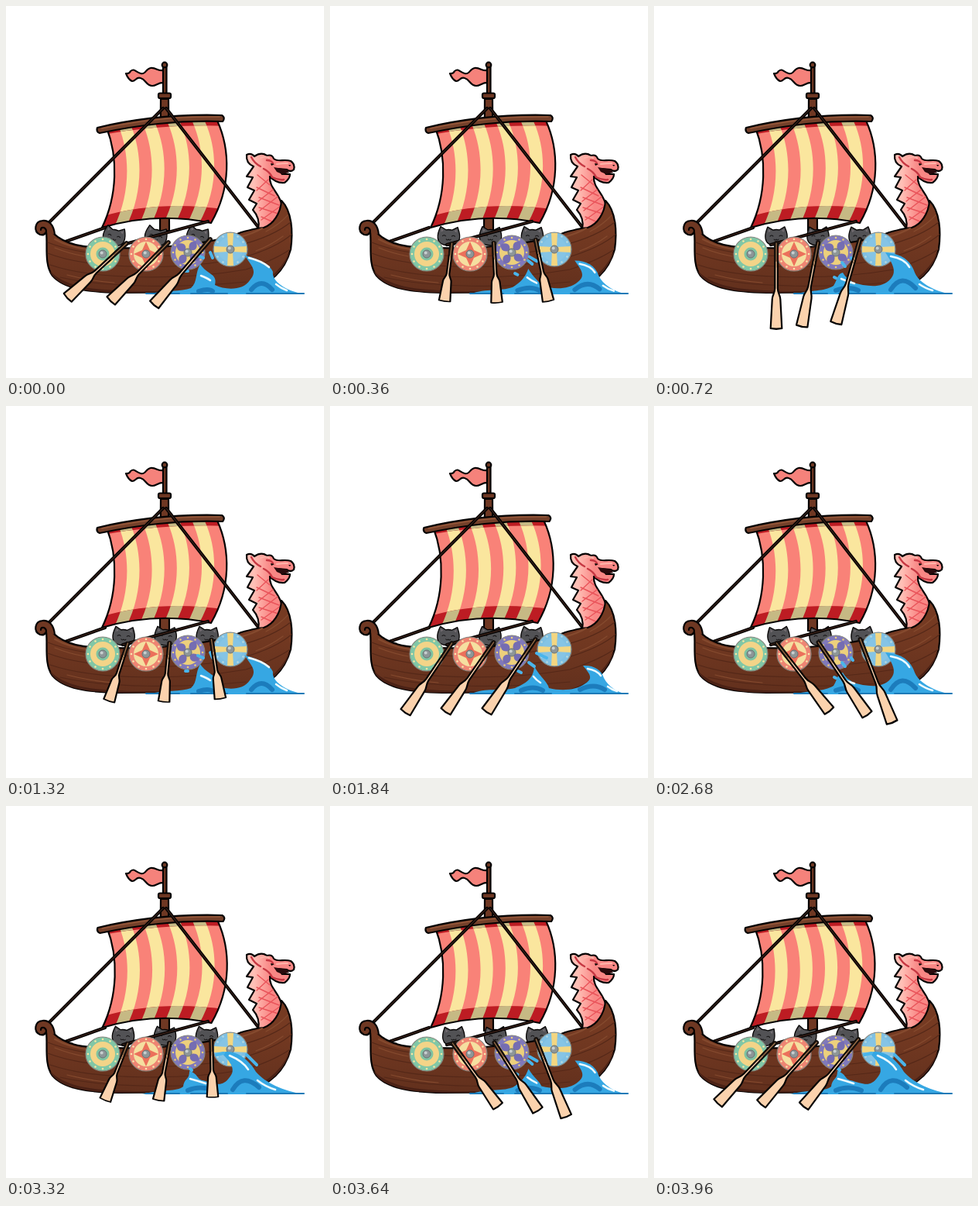
Animation of 411x480 px, one loop 4000 ms. Source, as an HTML page:

```html
<!DOCTYPE html>
<html lang="en">
<head>
<meta charset="utf-8">
<title>Longship</title>
<style>
html, body { margin: 0; width: 100%; height: 100%; overflow: hidden; background: #fff; }
svg { display: block; width: 100vw; height: 100vh; }
.ink { stroke: #050303; stroke-width: 2.2; stroke-linejoin: round; stroke-linecap: round; }
.line { fill: none; stroke-linecap: round; stroke-linejoin: round; }
.wood { fill: #6f3823; }
</style>
</head>
<body>
<svg viewBox="0 0 411 480">
  <defs>
    <linearGradient id="hullFill" x2="0" y2="1">
      <stop offset=".3" stop-color="#753a22"/><stop offset="1" stop-color="#62301d"/>
    </linearGradient>
    <linearGradient id="neckFill"><stop offset=".15" stop-color="#ffc0b6"/><stop offset=".5" stop-color="#f98785"/></linearGradient>
    <clipPath id="sailClip"><path class="sailShape"/></clipPath>
    <clipPath id="hullClip"><path class="hullShape"/></clipPath>
    <clipPath id="bandClip"><path d="M110,150 Q190,134 290,139 V155 Q195,151 110,169Z M110,276 Q195,247 300,265 V296 H110Z"/></clipPath>
    <g id="cat">
      <path class="ink" fill="#525255" style="stroke-width:1.3" d="M-14,4 C-15,-2 -13,-6 -11,-11 L-4,-7 Q0,-8 4,-7 L11,-11 C13,-6 15,-2 14,4 C13,11 7,13 0,13 S-13,11 -14,4Z"/>
      <path fill="#777075" d="M-10,-8 L-7,-6 -10,-4Z M10,-8 L7,-6 10,-4Z"/>
      <path class="line" stroke="#151314" stroke-width="1" d="M-8,1 q2,-2 4,0 M4,1 q2,-2 4,0 M-3,5 q1.5,2 3,0 q1.5,2 3,0"/>
    </g>
    <g id="oar">
      <path class="ink" fill="#fbd2ad" d="M-1.8,0 L-1.8,56 C-2,63 -5,64 -5.3,70 L-7.3,106 Q0,107.500 7.300,106 L5.300,70 C5,64 2,63 1.800,56 L1.800,0Z"/>
      <path class="line" stroke="#16100d" stroke-width="5.6" d="M0,0 V20"/>
      <path class="line" stroke="#a8794f" stroke-width="1.2" d="M0,0 V30"/>
    </g>
  </defs>

  <!-- mast and flag -->
  <path class="ink" fill="#f5827b" d="M205,82 C197,86 195,79 187,80 C180,81 181,89 174,87 C167,85 166,80 161,84 Q159,88 155,87 Q158,95 163,97 C168,97 168,91 174,93 C181,95 181,103 189,103 C195,103 196,98 206,99Z"/>
  <path fill="#4b1c19" d="M206,82 C201,84 201,93 206,96Z"/>
  <path class="ink wood" d="M203,78 H207.500 V114 H203Z"/>
  <circle class="ink wood" cx="205" cy="76" r="3.300"/>
  <path class="ink wood" d="M200,120 H210 L211,290 H199Z"/>
  <rect class="ink wood" x="197" y="112.500" width="16" height="6.500" rx="2"/>

  <g id="sail">
    <g id="stripes" clip-path="url(#sailClip)"></g>
    <path class="ink sailShape" fill="none"/>
    <path class="ink" fill="#74402a" d="M118,157 C160,147 210,139 279,141 Q284,144 280,149 C220,147 170,154 121,164 Q116,162 118,157Z"/>
    <path class="line" stroke="#955739" stroke-width="1.500" d="M124,158 C165,149 215,142 276,143"/>
  </g>

  <g id="cats"></g>
  <g id="ropes" class="line"></g>

  <!-- dragon figurehead -->
  <path class="ink" fill="url(#neckFill)" d="M326,288 Q329,274 319,263 L324,255 L314,250 L321,238 L312,234 L319,221 L311,220 L320,207 Q310,203 311,192 Q317,189 321,194 Q330,188 337,193 Q344,191 346,197 C352,202 359,197 368,200 Q374,204 372,211 Q368,215 363,211 L352,210 L357,217 L367,217 Q367,223 360,228 Q349,229 341,220 C340,235 353,240 357,258 C358,274 345,287 326,288Z"/>
  <path class="line" stroke="#e9545a" stroke-width="1.400" d="M325,218 L341,231 M339,224 L324,238 M324,234 L347,245 M345,237 L326,252 M327,247 L353,257 M351,246 L328,264 M327,260 L355,269 M355,258 L330,276 M330,272 L348,280"/>
  <path class="line" stroke="#c73843" stroke-width="2.500" d="M317,195 Q321,203 329,207 M337,199 Q343,199 345,203 M333,210 Q341,214 344,221 Q352,225 359,224"/>
  <path class="line" stroke="#ffb5ab" stroke-width="2" d="M329,196 Q337,193 340,196 M350,204 Q357,203 364,203"/>
  <path fill="#2a0b0d" d="M346,208 L363,211 366,215 357,217 350,214Z"/>
  <path d="M342,203 l5,1 -4,2Z M365,205 h3 l-1,2Z"/>

  <!-- hull -->
  <path class="hullShape ink" fill="url(#hullFill)"/>
  <g clip-path="url(#hullClip)" class="line" stroke="#552818" stroke-width="1.200">
    <path d="M54,305 C110,328 230,328 300,309 Q345,298 369,278 M54,319 C110,341 230,341 305,325 Q350,312 370,294 M57,334 C115,354 230,354 310,340 Q350,327 370,312 M70,350 C130,364 230,364 310,356"/>
    <path stroke="#854a2e" d="M63,312 Q80,319 101,323 M336,291 Q353,282 364,270 M79,347 Q110,355 140,357 M323,316 Q342,309 358,297"/>
    <path stroke="#4a2115" stroke-width="4" d="M56,344 C78,367 120,369 175,370 H300 Q349,360 368,319"/>
  </g>
  <path class="ink wood" d="M63,295 C62,282 55,276 47,277 C37,278 35,291 44,295 C51,297 55,289 49,286 Q45,285 45,289"/>
  <path class="line" stroke="#854a2e" stroke-width="2" d="M63,301 Q82,311 104,314 M270,305 Q309,299 331,287"/>

  <g id="shields"></g>

  <!-- water -->
  <path id="wave" fill="#36a7e3"/>
  <path id="shade" class="line" stroke="#1c7cbc" stroke-width="6"/>
  <path id="foam" class="line" stroke="#eefbff" stroke-width="2.6"/>
  <path id="drops" class="line" stroke="#49b5ec" stroke-width="4"/>
  <path class="line" stroke="#1d7ab7" stroke-width="2" d="M181,371 H224 M239,371 H286 M311,371 H385"/>

  <g id="oars"></g>
</svg>
<script>
const $ = id => document.getElementById(id);
const NS = 'http://www.w3.org/2000/svg';
const add = (parent, tag, attrs) => {
  const node = document.createElementNS(NS, tag);
  for (const key in attrs) node.setAttribute(key, attrs[key]);
  parent.append(node);
  return node;
};
const setShape = (name, d) => document.querySelectorAll('.' + name).forEach(e => e.setAttribute('d', d));

setShape('hullShape', 'M53,282 C60,297 80,310 112,311 C185,316 270,307 304,292 Q326,286 333,286 C345,282 355,268 356,251 C370,265 371,292 368,314 C361,340 342,360 310,369 L145,370 C105,369 75,365 60,348 C49,333 54,309 52,292Z');
setShape('sailShape', 'M130,157 Q190,145 273,148 C290,185 291,235 265,280 Q195,265 124,286 C144,245 145,195 130,157Z');

// Vertical curve across the sail, u running from its left to its right edge.
const seam = u => [[130 + 143 * u, 157 - 9 * u], [145 + 145 * u, 195 - 10 * u],
  [144 + 147 * u, 245 - 10 * u], [124 + 141 * u, 286 - 6 * u]];
function drawSail() {
  const area = { x: 110, y: 135, width: 190, height: 160 };
  const stripe = i => {
    const a = seam(i / 9), b = seam((i + 1) / 9);
    return `M${a[0][0]},135 L${a[0]} C${a.slice(1).join(' ')} L${a[3][0] - 6},296 H${b[3][0] - 6} L${b[3]} C${b[2]} ${b[1]} ${b[0]} V135Z`;
  };
  const d = [1, 3, 5, 7].map(stripe).join('');
  const paint = (g, red, cream) => {
    add(g, 'rect', { ...area, fill: red });
    add(g, 'path', { d, fill: cream });
  };
  paint($('stripes'), '#f98278', '#fae69e');
  paint(add($('stripes'), 'g', { 'clip-path': 'url(#bandClip)' }), '#bd1c23', '#c6b984');
}

function drawRopes() {
  const d = 'M203,132 L55,280 M207,132 L325,284 M74,305 L128,286 M151,308 L261,278';
  add($('ropes'), 'path', { d, stroke: '#080504', 'stroke-width': 4.2 });
  add($('ropes'), 'path', { d, stroke: '#4a291e', 'stroke-width': 1 });
}

function drawShield(x, y, rim, field, dots, emblem) {
  const g = add($('shields'), 'g', { transform: `translate(${x},${y})` });
  const disc = (r, fill, stroke = 'none', w = 1) => add(g, 'circle', { r, fill, stroke, 'stroke-width': w });
  disc(22, rim, '#85857d', 1.2);
  disc(16, field);
  for (let i = 0; i < 12; i++) {
    const a = i * Math.PI / 6;
    add(g, 'circle', { cx: 19 * Math.cos(a), cy: 19 * Math.sin(a), r: 1.3, fill: dots });
  }
  emblem(g, disc);
  disc(5, '#8d9698', '#697274');
  add(g, 'circle', { cx: -1.3, cy: -1.5, r: 2, fill: '#c7cecf' });
}
function drawShields() {
  drawShield(125, 320, '#80c7a6', '#f3d488', '#f6e6a4', (g, disc) => disc(8.5, '#7fc3a2'));
  drawShield(181, 320, '#ee8573', '#f5dfa0', '#f8e7ad', g =>
    add(g, 'path', { d: 'M0,-16 L5,-5 16,0 5,5 0,16 -5,5 -16,0 -5,-5Z', fill: '#ec705b' }));
  drawShield(235, 318, '#8079bb', '#ecd07c', '#ebcf78', g => {
    for (let a = 0; a < 360; a += 90)
      add(g, 'path', { d: 'M0,-4 C8,-5 9,-13 2,-17 C-5,-15 -5,-9 0,-4Z', fill: '#756db2', transform: `rotate(${a + 30})` });
  });
  drawShield(290, 314, '#7fc0e3', '#85c4e5', '#b8d9df', g =>
    add(g, 'path', { d: 'M-4,-21 H4 L3,-3 21,-4 V4 L3,3 4,21 H-4 L-3,3 -21,4 V-4 L-3,-3Z', fill: '#f3d681' }));
}

drawSail();
drawRopes();
drawShields();

// Rows are [phase, values...]; returns the values at the phase.
function sample(keys, p) {
  let i = 1;
  while (i < keys.length - 1 && keys[i][0] < p) i++;
  const a = keys[i - 1], b = keys[i];
  const k = Math.min(1, Math.max(0, (p - a[0]) / (b[0] - a[0])));
  return a.slice(1).map((v, j) => v + (b[j + 1] - v) * k);
}

const STROKE = 1010, SWELL = 655;
const rowers = [
  { x: 158, y: 306, tips: [[0, 79, 377], [290, 128, 380], [310, 133, 381], [560, 208, 382], [660, 227, 394], [720, 158, 417], [830, 97, 396], [930, 82, 384], [1010, 79, 377]] },
  { x: 212, y: 305, tips: [[0, 135, 381], [290, 197, 380], [310, 204, 382], [560, 262, 388], [660, 276, 399], [720, 191, 414], [830, 149, 395], [930, 138, 385], [1010, 135, 381]] },
  { x: 266, y: 301, tips: [[0, 191, 386], [290, 267, 376], [310, 277, 378], [560, 303, 394], [660, 308, 409], [720, 235, 410], [830, 202, 395], [930, 193, 388], [1010, 191, 386]] }
];
const lean = [[0, -17], [300, -5], [660, 4], [720, 1], [830, -4], [930, -15], [1010, -17]];
for (const r of rowers) {
  r.cat = add($('cats'), 'use', { href: '#cat' });
  r.oar = add($('oars'), 'use', { href: '#oar' });
}

// Each pose lists the same path commands so that the numbers can be blended.
const poses = {
  low: {
    wave: 'M181,372 C207,366 226,369 239,364 C248,356 244,345 251,333 C260,347 274,345 270,360 C284,367 307,367 315,354 C326,342 317,335 308,321 C321,326 340,331 345,343 C343,355 362,368 386,372Z',
    shade: 'M249,368 Q262,364 267,368 M317,366 Q330,350 344,366', foam: 'M314,325 Q331,329 340,337 M252,348 Q260,351 264,354 M349,359 Q355,364 363,367',
    drops: 'M248,322 L255,325 M264,318 L267,325 M232,342 L235,342'
  },
  high: {
    wave: 'M176,372 C204,365 220,369 229,362 C231,350 237,354 237,342 C248,345 247,353 254,354 C270,358 279,364 289,350 C297,341 292,332 279,319 C292,312 313,325 323,343 C335,357 358,368 386,372Z',
    shade: 'M235,367 Q251,360 268,367 M293,366 Q306,344 327,363', foam: 'M289,322 Q306,329 313,340 M238,352 Q249,355 258,358 M325,354 Q335,362 348,366',
    drops: 'M238,339 L240,341 M311,321 L324,334 M272,321 L281,319'
  },
  tongue: {
    wave: 'M179,372 C206,366 218,369 232,361 C237,354 236,346 244,344 C250,354 253,352 257,357 C274,361 293,366 306,352 C314,343 309,333 299,318 C315,319 331,325 337,344 C342,356 360,368 386,372Z',
    shade: 'M235,367 Q252,361 264,367 M306,366 Q320,344 338,364', foam: 'M306,323 Q324,326 330,337 M242,352 Q251,356 259,358 M343,359 Q350,364 360,367',
    drops: 'M243,331 L247,336 M255,325 L257,328 M233,350 L235,351'
  },
  fallen: {
    wave: 'M181,372 C203,362 219,369 239,364 C253,358 263,352 264,336 C272,350 281,356 283,364 C299,368 318,367 330,358 C342,351 334,344 327,335 C340,334 351,340 354,351 C360,362 370,369 384,372Z',
    shade: 'M247,367 Q263,360 275,367 M323,366 Q341,357 355,366', foam: 'M333,339 Q345,341 350,348 M263,349 Q267,354 272,357 M359,362 Q364,366 371,368',
    drops: 'M267,319 L280,325 M257,331 L264,336 M243,342 L247,344'
  }
};
const swell = [[0, 'low'], [12, 'low'], [30, 'high'], [45, 'high'], [60, 'tongue'], [90, 'tongue'], [530, 'fallen'], [655, 'low']];
const blend = (a, b, k) => {
  const to = b.match(/\d+/g);
  let i = 0;
  return a.replace(/\d+/g, n => (+n + (to[i++] - n) * k).toFixed(1));
};

function drawWater(p) {
  const i = swell.findIndex(s => s[0] > p);
  const [start, from] = swell[i - 1], [end, to] = swell[i];
  for (const id of ['wave', 'shade', 'foam', 'drops'])
    $(id).setAttribute('d', blend(poses[from][id], poses[to][id], (p - start) / (end - start)));
}

function draw(t) {
  const p = t % STROKE, w = t % SWELL;
  const dx = sample(lean, p)[0];
  for (const r of rowers) {
    const [tx, ty] = sample(r.tips, p);
    const px = r.x + dx * .12;
    const len = Math.hypot(tx - px, ty - r.y);
    const angle = Math.atan2(px - tx, ty - r.y) * 180 / Math.PI;
    r.oar.setAttribute('transform', `translate(${px},${r.y}) rotate(${angle}) scale(1,${len / 107})`);
    r.cat.setAttribute('transform', `translate(${r.x - 1 + dx},296) rotate(${-dx * .8})`);
  }
  const sway = 6 * Math.min(1, 1.8 * (1 - Math.cos(2 * Math.PI * w / SWELL)) / 2);
  $('sail').setAttribute('transform', `translate(${sway.toFixed(2)},0)`);
  drawWater(w);
}

const origin = performance.now();
function tick() {
  const t = (performance.now() - origin) % 4000;
  draw(Math.floor(t / 40) * 40);
  requestAnimationFrame(tick);
}
tick();
</script>
</body>
</html>
```
